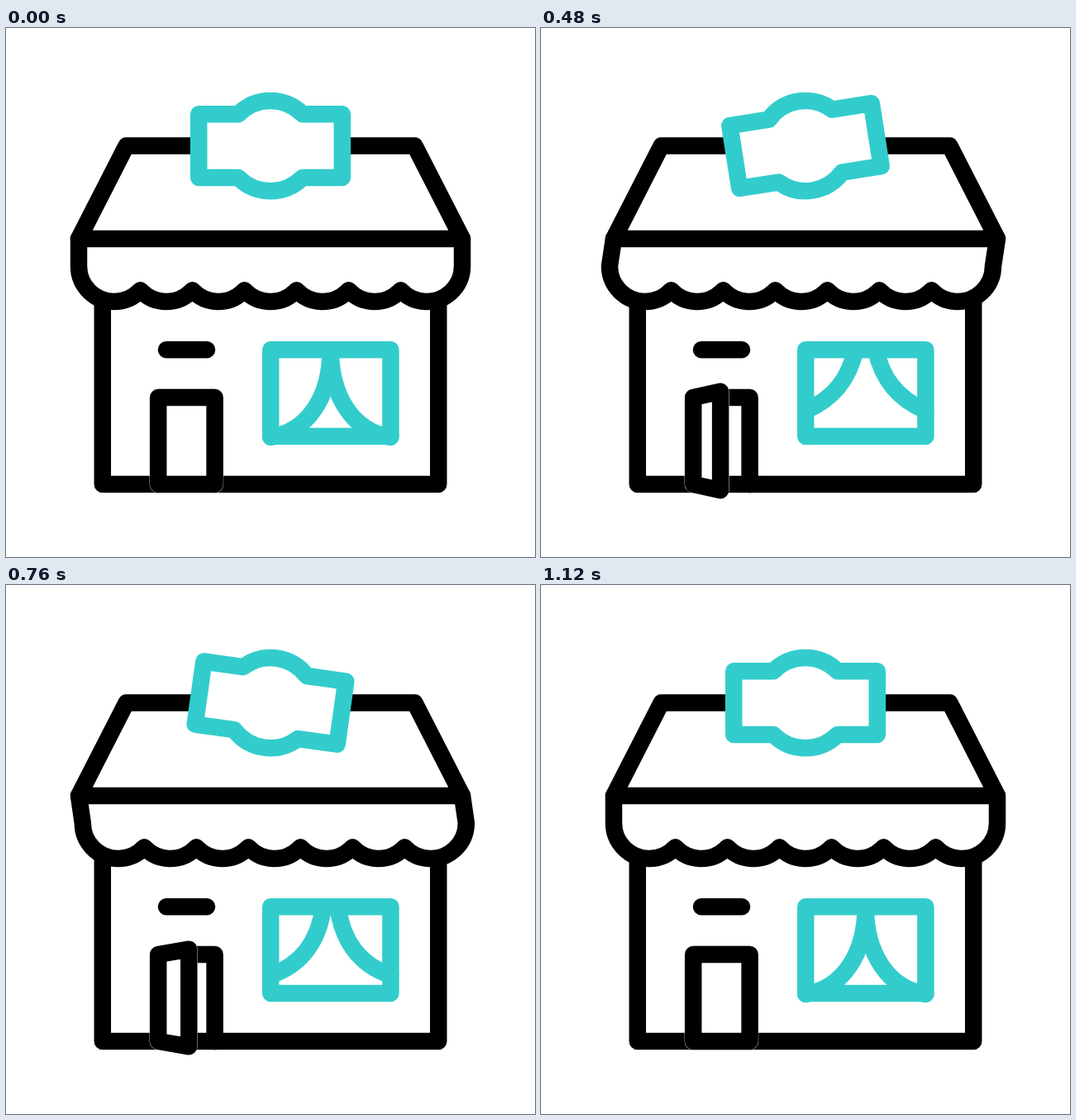
An HTML page with a canvas for the animation above (1.2 s loop, 640x640 px).

```html
<!DOCTYPE html>
<html lang="en">
<head>
<meta charset="utf-8">
<title>Shop</title>
<style>
  html, body { margin: 0; width: 100%; height: 100%; overflow: hidden; background: #fff; }
  canvas { display: block; width: 640px; height: 640px; }
</style>
</head>
<body>
<canvas id="stage" width="640" height="640"></canvas>
<script>
const ctx = document.getElementById('stage').getContext('2d');
const LOOP = 1200, TICK = 40, LINE = 20.5;
const INK = '#000', TEAL = '#33cccc', PAPER = '#fff';

const mix = (a, b, k) => a + (b - a) * k;

// Strong symmetric ease: cubic bezier (.6, 0, .4, 1)
function ease(u) {
  let lo = 0, hi = 1;
  for (let i = 0; i < 24; i++) {
    const s = (lo + hi) / 2, r = 1 - s;
    if (1.8 * s * r * r + 1.2 * s * s * r + s * s * s < u) lo = s; else hi = s;
  }
  return lo * lo * (3 - 2 * lo);
}

// keys: [time, value] pairs, eased in between
function track(t, keys) {
  if (t <= keys[0][0]) return keys[0][1];
  for (let i = 1; i < keys.length; i++) {
    const [t0, v0] = keys[i - 1], [t1, v1] = keys[i];
    if (t < t1) return mix(v0, v1, ease((t - t0) / (t1 - t0)));
  }
  return keys[keys.length - 1][1];
}

const SIGN = [[40, 0], [400, -10], [760, 8], [1120, 0]];
const VALANCE = [[120, 0], [440, -5.2], [760, 4.8], [1080, 0]];
const DOOR = [[40, 0], [600, 1], [1080, 0]];
const CURTAIN = [[80, 0], [560, 1], [1040, 0]];

function stroke(color, width = LINE) {
  ctx.strokeStyle = color;
  ctx.lineWidth = width;
  ctx.stroke();
}

function fill() {
  ctx.fillStyle = PAPER;
  ctx.fill();
}

function poly(points, closed) {
  ctx.beginPath();
  points.forEach(([x, y]) => ctx.lineTo(x, y));
  if (closed) ctx.closePath();
}

function walls() {
  ctx.lineCap = 'butt';
  poly([[116.8, 330], [116.8, 552], [523.2, 552], [523.2, 330]]);
  stroke(INK);
  ctx.lineCap = 'round';
  poly([[194, 389.2], [243, 389.2]]);
  stroke(INK);
}

function door(open) {
  const left = 184.2, right = 252.6, top = 447, base = 552;
  poly([[left, base], [left, top], [right, top], [right, base]]);
  stroke(INK);
  const x = right - 37.6 * open, dy = 7.6 * open;
  poly([[left, top], [x, top - dy], [x, base + dy], [left, base]], true);
  fill();
  stroke(PAPER, LINE + 0.6);
  stroke(INK);
}

function shopWindow(open) {
  const at = (x0, y0, x1, y1) => [mix(x0, x1, open), mix(y0, y1, open)];
  const curve = [
    at(392.6, 389.2, 380, 389.2),
    at(392.6, 445, 373, 420),
    at(366, 488, 357, 446),
    at(320, 495, 320, 462)
  ];
  for (const flip of [false, true]) {
    const [a, b, c, d] = curve.map(([x, y]) => [flip ? 785.4 - x : x, y]);
    ctx.beginPath();
    ctx.moveTo(...a);
    ctx.bezierCurveTo(...b, ...c, ...d);
    stroke(TEAL);
  }
  ctx.beginPath();
  ctx.rect(320.2, 389.2, 145.2, 104.8);
  stroke(TEAL);
}

function awning(dx) {
  const r = 43, cy = 288, step = 63, half = Math.acos(step / 2 / r);
  ctx.beginPath();
  ctx.moveTo(88, 255);
  ctx.lineTo(88 + dx, cy);
  for (let i = 0; i < 7; i++) {
    const from = i === 0 ? Math.PI : Math.PI - half;
    const to = i === 6 ? 0 : half;
    ctx.arc(131 + dx + step * i, cy, r, from, to, true);
  }
  ctx.lineTo(552, 255);
  stroke(INK);
  poly([[88, 255], [145.5, 142.6], [494.5, 142.6], [552, 255]], true);
  stroke(INK);
}

function sign(angle) {
  const w = 86.8, h = 38.4, r = 54.6, a = Math.asin(h / r);
  ctx.save();
  ctx.translate(320, 142.6);
  ctx.rotate(angle * Math.PI / 180);
  ctx.beginPath();
  ctx.moveTo(-w, -h);
  ctx.arc(0, 0, r, Math.PI + a, -a);
  ctx.lineTo(w, -h);
  ctx.lineTo(w, h);
  ctx.arc(0, 0, r, a, Math.PI - a);
  ctx.lineTo(-w, h);
  ctx.closePath();
  fill();
  stroke(TEAL);
  ctx.restore();
}

function draw(t) {
  ctx.fillStyle = PAPER;
  ctx.fillRect(0, 0, 640, 640);
  ctx.lineJoin = 'round';
  walls();
  door(track(t, DOOR));
  shopWindow(track(t, CURTAIN));
  awning(track(t, VALANCE));
  sign(track(t, SIGN));
}

const start = performance.now();
function frame() {
  const t = (performance.now() - start) % LOOP;
  draw(Math.floor(t / TICK) * TICK);
  requestAnimationFrame(frame);
}
frame();
</script>
</body>
</html>
```
